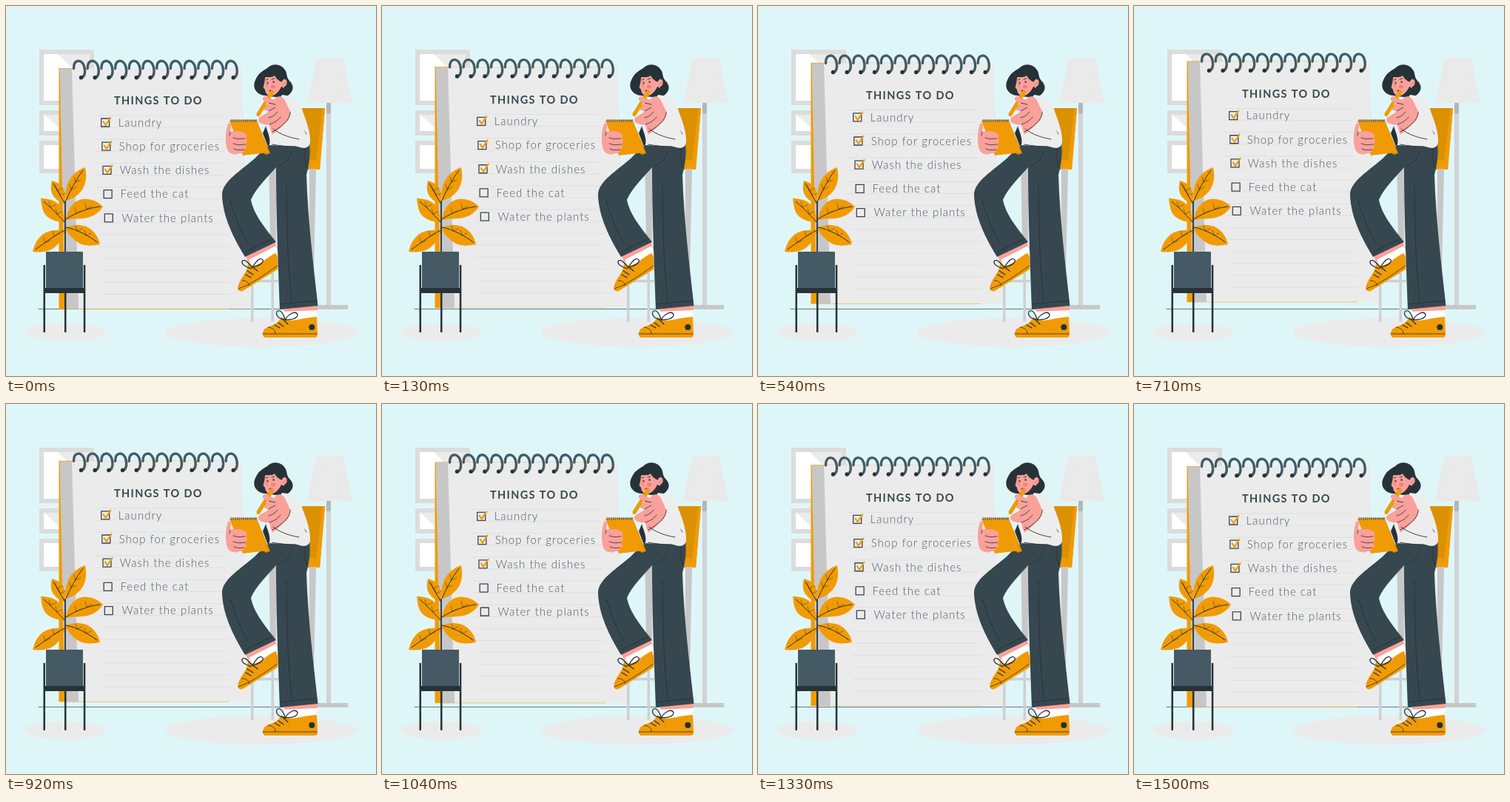
Animation, 500 px wide and 500 px high, one loop 1.54 s. Source, as an HTML page with a canvas:

```html
<!DOCTYPE html>
<html lang="en">
<head>
<meta charset="utf-8">
<style>
html, body { margin: 0; width: 100%; height: 100%; overflow: hidden; background: #dff6f9; }
canvas { display: block; width: 100vw; height: 100vh; object-fit: contain; }
</style>
</head>
<body>
<canvas id="stage" width="500" height="500"></canvas>
<script>
const ctx = document.getElementById('stage').getContext('2d');
const LOOP = 1540, FPS = 24, FLOAT_PERIOD = 1500, FLOAT_HEIGHT = 10, FLOAT_PHASE = 21;
const ORANGE = '#f19b04', AMBER = '#dc9003', DARK = '#263238', SLATE = '#37474f',
      STEEL = '#455a64', PAPER = '#ebebeb', GREY = '#c7c7c7', SKIN = '#f9a19a',
      SHIRT = '#ededed', WHITE = '#fff';

function fill(color, d) {
  ctx.fillStyle = color;
  ctx.fill(new Path2D(d));
}

function line(color, width, d) {
  ctx.strokeStyle = color;
  ctx.lineWidth = width;
  ctx.lineCap = ctx.lineJoin = 'round';
  ctx.stroke(new Path2D(d));
}

function box(color, x, y, w, h) {
  ctx.fillStyle = color;
  ctx.fillRect(x, y, w, h);
}

function oval(color, x, y, rx, ry = rx, turn = 0) {
  ctx.fillStyle = color;
  ctx.beginPath();
  ctx.ellipse(x, y, rx, ry, turn, 0, 7);
  ctx.fill();
}

function text(str, x, y, font, color, spacing) {
  ctx.font = font + ' Lato, sans-serif';
  ctx.letterSpacing = spacing + 'px';
  ctx.fillStyle = color;
  ctx.fillText(str, x, y);
}

function drawRoom() {
  box('#dff6f9', 0, 0, 500, 500);
  // picture frames
  for (const [y, w, h] of [[59, 74, 75], [141, 74, 34], [182, 74, 44]]) {
    box('#dcdcdc', 45, y, w, h);
    box(WHITE, 51, y + 6, w - 12, h - 12);
  }
  fill('#ebebeb', 'M70 65H113V108Z');
  fill('#ebebeb', 'M52 147H113V169H76Z');
  oval(PAPER, 80, 441, 55, 12.5);
  oval(PAPER, 344, 441, 130, 19.5);
  line(STEEL, 0.8, 'M44 409.5H461');
  drawLamp();
}

function drawLamp() {
  box('#d2d2d2', 433, 131, 6, 274);
  box('#b5b5b5', 433, 131, 6, 14);
  box(GREY, 402, 404, 60, 6);
  const shade = 'M420 70H455L468 131H407Z';
  fill('#e8e8e8', shade);
  ctx.save();
  ctx.clip(new Path2D(shade));
  for (let x = 350; x < 470; x += 5) line('#f0f0f0', 0.8, `M${x} 131L${x + 55} 70`);
  ctx.restore();
}

function drawRing(x) {
  line(STEEL, 3.4, `M${x - 10} 84.5C${x - 10} 71 ${x + 1} 72 ${x + 4} 81C${x + 6.5} 90 ${x + 4.5} 96 ${x} 97`);
  oval(DARK, x, 96.7, 2.7);
}

function drawPad() {
  const items = [
    ['Laundry', 151.7, true], ['Shop for groceries', 152.7, true], ['Wash the dishes', 153.8, true],
    ['Feed the cat', 154.5, false], ['Water the plants', 156.5, false]
  ];
  fill(ORANGE, 'M71.5 84H302V409.7H71.5Z');
  fill(GREY, 'M72.5 84.6H90L101 409.4H79.5Z');
  fill(PAPER, 'M89 84H318L331 409.3H98Z');
  for (let i = 0; i < 16; i++) {
    const y = 389.5 - i * 16.1;
    line('#dcdcdc', 0.8, `M${129 - i * 0.6} ${y}H${303 - i * 0.6}`);
  }
  for (let i = 0; i < 12; i++) drawRing(101.5 + i * 18.7);
  text('THINGS TO DO', 146, 133.3, '700 14.5px', SLATE, 1.35);
  items.forEach(([label, x, done], i) => {
    const y = 157.5 + i * 32.2, bx = 128.7 + i * 1.15;
    text(label, x, y + 5.3, '300 15px', '#4c5a61', 1.03);
    ctx.strokeStyle = SLATE;
    ctx.lineWidth = 1.3;
    ctx.strokeRect(bx, y - 5.5, 11, 11);
    if (done) line(ORANGE, 2.2, `M${bx + 3} ${y - 1}l3 4.5l6.5 -10`);
  });
}

function drawPlant() {
  const leaves = [
    ['M81 263C79 250 82 238 90 229C96 223 101 220 107 218C109 228 109 239 103 248C97 257 89 261 81 263Z', 'M81 263C87 249 95 234 104 222', [[88, 248], [94, 238]]],
    ['M79 267C81 258 80 249 75 243C71 239 66 237 62 236C60 244 60 252 65 258C69 263 74 266 79 267Z', 'M79 266C73 256 68 247 64 240', [[73, 256], [69, 249]]],
    ['M79 292C79 283 77 274 70 267C64 262 56 260 47 260C48 269 49 278 55 284C62 290 70 292 79 292Z', 'M79 292C68 280 59 271 51 264', [[69, 281], [60, 272]]],
    ['M80 303C66 302 54 303 46 312C40 318 38 325 36 332C50 334 61 331 68 324C75 317 78 310 80 303Z', 'M79 303C64 311 51 321 40 329', [[65, 311], [53, 320]]],
    ['M81 290C84 268 97 259 110 261C120 262 126 266 131 271C125 281 115 286 104 287C94 288 87 287 81 290Z', 'M81 288C95 279 111 273 127 271', [[95, 280], [109, 274]]],
    ['M80 300C92 294 106 295 115 302C122 308 125 314 127 322C112 325 103 324 95 318C87 312 83 306 80 300Z', 'M81 299C97 302 112 311 123 319', [[96, 304], [108, 310]]]
  ];
  for (const [outline, vein, forks] of leaves) {
    fill(ORANGE, outline);
    line(DARK, 1, vein);
    for (const [x, y] of forks) line(DARK, 0.5, `M${x} ${y}l7 -3M${x} ${y}l-2 -7`);
  }
  line(DARK, 1.8, 'M80 333V264');
  box(STEEL, 54, 332, 50, 50);
  box(DARK, 52, 381, 54, 7);
  box(DARK, 50.5, 350, 2.5, 91);
  box(DARK, 79, 382, 2.5, 59);
  box(DARK, 104.8, 350, 2.5, 91);
}

function drawChair() {
  fill(AMBER, 'M400 138H431L424 221H402Z');
  fill(ORANGE, 'M428 138H431L424 221L404 219V207L419 209Z');
  fill(GREY, 'M410 220H419L415 405H409Z');
  fill(GREY, 'M355 205H365V318H357Z');
  box('#d0d0d0', 331, 360, 3.5, 67);
  box('#d0d0d0', 358.5, 360, 3.5, 67);
  box('#d0d0d0', 332, 370, 36, 3.5);
}

function drawShoes() {
  fill(SKIN, 'M323 337L363 318L367 327L328 346Z');
  fill(WHITE, 'M328 343L365 324L368 337L340 355Z');
  fill(ORANGE, 'M327 347C338 358 349 341 364 334C367 335 368 346 367 356L320 385C314 387 312 382 314 377C318 365 327 360 327 347Z');
  line(DARK, 0.8, 'M314 382C332 376 348 364 367 351M319 371C325 371 328 374 329 378');
  line(DARK, 1.3, 'M331 355C324 352 318 350 319 345C322 340 331 350 333 354C336 347 343 338 347 343C349 348 340 351 333 354M326 358l8 5M324 363l7 4M332 352l8 6');

  fill(SKIN, 'M374 407L421 403L420 414L378 417Z');
  fill(WHITE, 'M374 413L420 411V423L376 427Z');
  fill(ORANGE, 'M372 420C383 430 399 421 420 420L421 444C421 447 419 448 416 448H350C346 447 346 440 350 436C358 431 369 430 372 420Z');
  line(DARK, 0.8, 'M347 443H420M354 434C361 435 364 438 364 443');
  line(DARK, 1.3, 'M376 424C368 422 364 418 366 413C371 408 376 418 377 424C382 416 391 411 394 417C394 423 385 424 377 424M368 428l7 5M363 431l7 4M374 423l7 7');
  oval(DARK, 413.3, 434, 4);
}

function drawTrousers() {
  fill(SLATE, 'M357 187L410 186C412 203 409 217 406 228C408 291 415 345 421.5 405L370 410C368 350 365 292 365 218C352 233 337 247 331 262C335 283 352 302 365 319L323 339C307 313 293 284 292 256C291 235 326 218 341 201Z');
  line(DARK, 0.9, 'M324 332L360 314M371 403L420 398M368 216C378 212 383 207 386 196M405 192C403 202 403 210 407 218M303 263C310 287 318 304 326 320M379 239C379 295 381 350 386 398');
}

function drawHead() {
  fill(DARK, 'M353 84C359 77 371 78 376 85C381 91 378 96 383 101C389 107 390 114 381 121L365 123L350 121C339 120 332 111 337 100C341 91 345 89 353 84Z');
  fill(SKIN, 'M351 94C349 100 350 103 348 108C347 111 349 111 350 113C351 120 356 123 361 122L371 122L376 110L374 92Z');
  fill(DARK, 'M359 122C366 119 370 114 372 109L376 111L374 123Z');
  fill(DARK, 'M349 96C350 83 370 79 376 88L378 99L373 103C368 101 365 98 363 94C360 97 355 96 349 96Z');
  oval(SKIN, 376, 104, 3.6, 5.2, 0.2);
  line('#c9665f', 0.7, 'M375 107C376 104 377 103 378 103');
  oval('#f27f78', 361, 109, 3, 2.4);
  oval(DARK, 353.5, 104, 1, 1.5);
  oval(DARK, 361.5, 102.5, 1, 1.5);
  line(DARK, 0.9, 'M351 100l3 -1M359 99l4 -1');
  line('#c9665f', 0.8, 'M354 104C353 107 351 109 353 110');
  oval('#c7443f', 357, 114.5, 2, 1.2, -0.3);
}

function drawTorso() {
  fill(DARK, 'M347 172L352 160L360 181L354 190Z');
  fill(SHIRT, 'M373 120C387 121 396 128 400 140C407 157 412 174 411 184C410 193 402 193 394 190L356 188C358 178 353 170 351 162L366 130Z');
  line(DARK, 0.9, 'M394 151C398 161 403 169 406 173M360 187C369 189 381 190 392 190');
}

function drawNotebook() {
  fill(AMBER, 'M304 157L339 155L357 199L351 201Z');
  fill(ORANGE, 'M302 155L338 154L355 198L320 202Z');
  for (let x = 304; x < 338; x += 2.8) line(SLATE, 0.8, `M${x} 156.5v-3l1.5 1`);
  fill(SKIN, 'M300 159C304 156 305 162 303 170C310 168 319 169 323 172C327 174 325 178 322 179C327 180 327 185 323 187C326 189 325 194 321 194C322 198 319 199 315 199C308 203 299 199 298 190C296 179 297 168 300 159Z');
  line(DARK, 0.8, 'M307 178C313 180 317 180 322 179M307 186C313 188 318 188 323 187M308 193C313 195 317 195 321 194M303 170L302 175');
}

function drawPencilHand() {
  line(ORANGE, 5, 'M359 117L341 146');
  fill(SKIN, 'M347 124C350 119 356 124 362 127C369 118 376 123 379 132C383 139 386 147 383 153L361 174C357 170 358 164 355 160C346 161 340 157 341 153C343 148 351 147 355 142C349 142 347 139 351 135L355 131C350 130 346 128 347 124Z');
  line(ORANGE, 4.5, 'M360 116L356 123M350 133L341 147');
  line(DARK, 0.8, 'M355 131L364 133M355 142L364 137M355 151C360 150 364 147 367 143M356 160C363 158 368 154 371 150');
  fill(SHIRT, 'M384 144L396 142L406 178L396 188L360 174C367 168 383 161 384 144Z');
  line(DARK, 0.9, 'M361 166C371 174 384 178 396 180M384 143C385 153 373 163 360 170');
}

function padLift(time) {
  const frame = Math.floor((time % LOOP + 6) * FPS / 1000);
  const phase = (frame * 1000 / FPS + FLOAT_PHASE) % FLOAT_PERIOD / FLOAT_PERIOD;
  return FLOAT_HEIGHT * (1 - Math.abs(2 * phase - 1));
}

function draw(time) {
  drawRoom();
  ctx.save();
  ctx.translate(0, 0.28 - padLift(time));
  drawPad();
  ctx.restore();
  drawPlant();
  drawChair();
  drawShoes();
  drawTrousers();
  drawHead();
  drawTorso();
  drawNotebook();
  drawPencilHand();
}

const start = performance.now();
function tick() {
  draw(performance.now() - start);
  requestAnimationFrame(tick);
}
tick();
</script>
</body>
</html>
```
